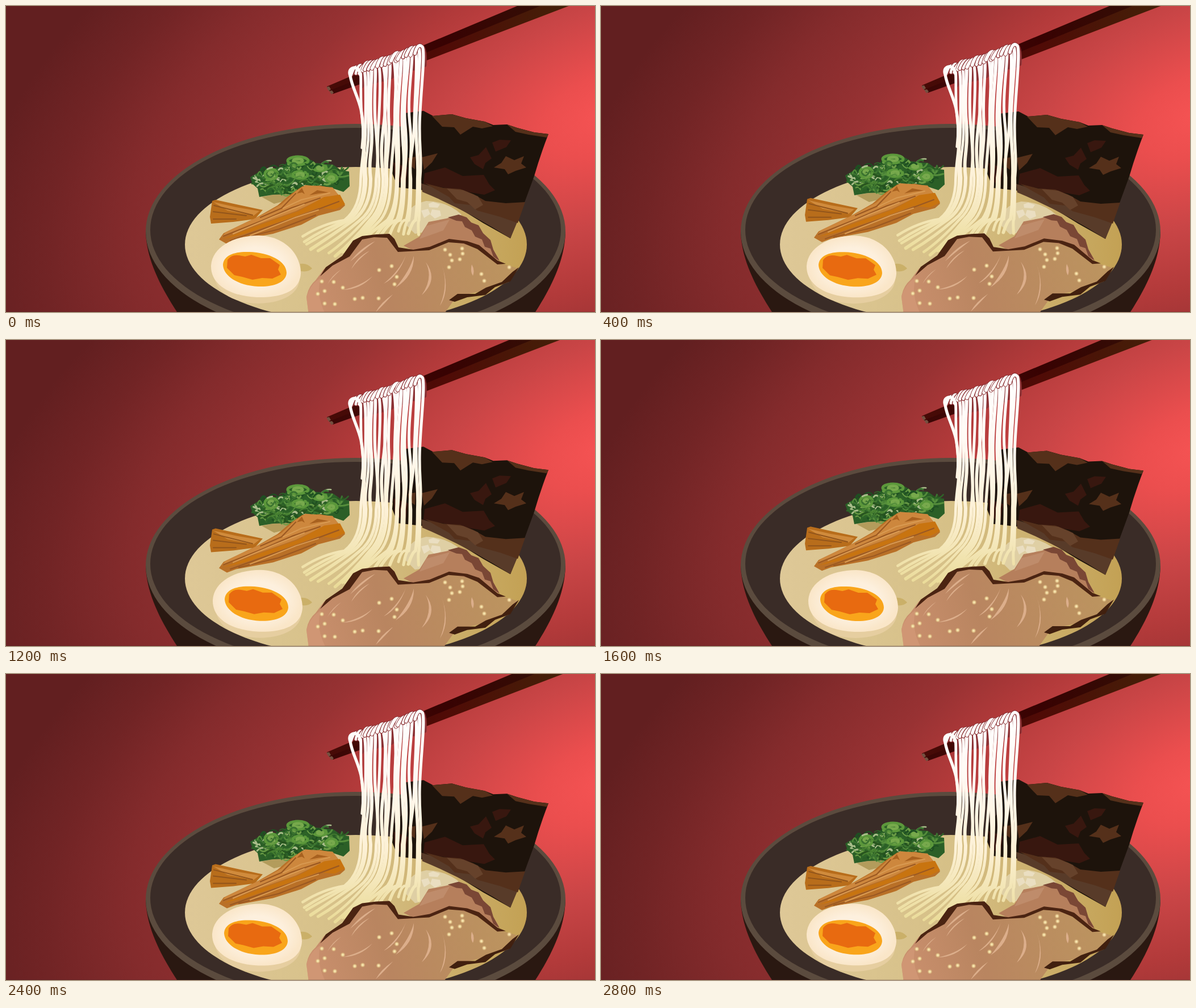
Recreate the animation shown at these times as an HTML page. Size 1037 by 540 pixels, loop 3200 ms.

```html
<!DOCTYPE html>
<html lang="en">
<head>
<meta charset="utf-8">
<title>Noodle bowl</title>
<style>
html, body { margin: 0; width: 100%; height: 100%; overflow: hidden; background: #802a2b }
svg { display: block; width: 1037px; height: 540px }
.line { fill: none; stroke-linecap: round; stroke-linejoin: round }
</style>
</head>
<body>
<svg viewBox="0 0 1037 540">
<defs>
  <radialGradient id="wall" gradientUnits="userSpaceOnUse" cx="0" cy="0" r="1" gradientTransform="translate(1060 190) rotate(-22) scale(1200 680)">
    <stop offset="0" stop-color="#f65353"/><stop offset=".1" stop-color="#eb4e4e"/>
    <stop offset=".27" stop-color="#c94546"/><stop offset=".42" stop-color="#b23a3a"/>
    <stop offset=".56" stop-color="#983233"/><stop offset=".74" stop-color="#842b2c"/>
    <stop offset=".87" stop-color="#712425"/><stop offset="1" stop-color="#621f20"/>
  </radialGradient>
  <linearGradient id="broth"><stop stop-color="#dec897"/><stop offset=".5" stop-color="#d6c087"/><stop offset="1" stop-color="#c3a154"/></linearGradient>
  <linearGradient id="strand" gradientUnits="userSpaceOnUse" x1="0" y1="70" x2="0" y2="440">
    <stop stop-color="#fff"/><stop offset=".3" stop-color="#fffaf4"/><stop offset=".65" stop-color="#fdf1d6"/><stop offset="1" stop-color="#eadb98"/>
  </linearGradient>
  <linearGradient id="meat" x1="0" y1=".5" x2="1" y2=".4"><stop stop-color="#c98f6d"/><stop offset=".35" stop-color="#b98560"/><stop offset="1" stop-color="#bc955f"/></linearGradient>
  <linearGradient id="stickTop" gradientUnits="userSpaceOnUse" x1="566" y1="0" x2="980" y2="0"><stop stop-color="#480b07"/><stop offset=".5" stop-color="#380202"/><stop offset="1" stop-color="#321006"/></linearGradient>
  <linearGradient id="stickLow" gradientUnits="userSpaceOnUse" x1="566" y1="0" x2="980" y2="0"><stop stop-color="#3a0605"/><stop offset=".5" stop-color="#500b06"/><stop offset="1" stop-color="#432008"/></linearGradient>
  <radialGradient id="white"><stop offset=".6" stop-color="#fdf0de"/><stop offset="1" stop-color="#fae6c8"/></radialGradient>
  <radialGradient id="seed"><stop stop-color="#fff3c4"/><stop offset=".5" stop-color="#ecd297"/><stop offset="1" stop-color="#d2ac75" stop-opacity=".5"/></radialGradient>
</defs>

<rect width="1037" height="540" fill="url(#wall)"/>
<path fill="#2a1811" d="M246 398C247 445 270 492 301 540H932C964 490 984 445 985 398Z"/>
<ellipse cx="615.5" cy="398" rx="369.5" ry="190" fill="#5b4b3e"/>
<ellipse cx="615.5" cy="395" rx="361.5" ry="180" fill="#3a2c27"/>
<ellipse cx="616" cy="421" rx="301" ry="137" fill="url(#broth)"/>
<path fill="#c2a351" opacity=".6" d="M518 455Q530 453 539 463Q533 470 519 468Z"/>

<g data-move="0 1.1">
  <path fill="#dfcfa4" d="M703 385Q702 352 740 344Q778 345 802 368L775 392 720 402Z"/>
  <path fill="#f0e7d1" opacity=".65" d="M744 349l8-3 12 4-4 6-15-1zM731 361l12-3 4 9-11 7zM750 359l14 2 2 9-11 5-8-7z"/>
  <path fill="#1d130b" d="M702 189L735 185 752 194 785 191 810 198 843 204 858 210 882 209 900 215 930 223 955 226Q941 262 930 300L911 352 888 410 840 383 790 352 735 325 690 320 680 295 683 262 703 240Z"/>
  <path fill="#55301a" d="M750 194L785 191 810 198 843 204 857 212 838 216 822 213 800 227 789 214 768 213ZM882 209L900 215 930 223 955 226 952 232 920 227 897 222ZM732 267L760 260 750 276 736 289ZM708 268L721 266 720 288 709 280ZM859 285L872 277 880 265 895 272 912 265 907 278 916 285 897 291 884 297 878 288Z"/>
  <path fill="#38170f" d="M856 241L869 236 889 237 881 249 862 257ZM817 267L832 263 845 249 855 269 844 277 840 288 825 279ZM682 276L708 285 703 320 684 302ZM737 295L773 285 804 300 841 298 851 315 861 325 842 333 800 326 735 314Z"/>
  <path fill="#583b29" d="M731 313Q790 330 850 351L904 372 888 410Q810 360 733 328Z"/>
  <path fill="#54301b" d="M738 313L770 321 800 323 823 332 844 344 880 348 914 346 901 383 870 372 830 361 817 351 790 348 780 337Z"/>
  <path fill="#66422b" d="M776 322L805 325 831 336 840 351 826 359 812 346 794 341Z"/>
</g>

<g data-move="0 -3">
  <path fill="#b39c5c" d="M450 337L495 328 500 342 472 349Z"/>
  <path fill="#2b5f27" d="M430 302L445 293 464 290 490 281 500 270 534 270 545 277 576 280 590 290 604 292 605 318 594 328 570 320 500 332 470 333 446 337 443 322 434 314Z"/>
  <g id="leaves" class="line"></g>
</g>

<g data-move="0 -3.2">
  <path fill="#b86d1b" d="M363 344L369 342 410 351 452 360 438 376 400 381 361 384 359 372Z"/>
  <path fill="#d08b3c" d="M365 346L405 355 446 362 436 370 390 361Z"/>
  <path class="line" stroke="#92551b" stroke-width="2" d="M366 352L434 369M365 363L423 370M365 376L405 376"/>
  <path fill="#b97027" d="M375 412L383 401 443 372 478 352 500 333 522 318 553 317 574 321 586 334 597 352 588 360 550 370 520 386 470 402 405 414 389 420Z"/>
  <path fill="#cd873d" d="M450 369L485 350 510 327 527 316 575 320 585 333 550 343 510 362 450 383 380 407 387 399Z"/>
  <path fill="#c87410" d="M382 411L450 385 515 362 560 337 588 333 597 350 579 359 550 356 490 378 420 402Z"/>
  <path class="line" stroke="#9b5922" stroke-width="2.2" d="M383 406L450 379 503 356 553 339M395 414L470 387 530 366 586 345M448 373L485 357 510 331M410 411L480 394 545 369"/>
  <path fill="#a8611f" d="M512 331l9-10 5 11-5-3zM534 334l14-9 20 4-18 2z"/>
  <path class="line" stroke="#d99b53" stroke-width="2" d="M400 402L470 372 525 350M430 405L510 373 550 360M488 357L520 342 570 330"/>
</g>

<g data-move="1 .25">
  <path fill="#e6cea0" d="M364 460C364 510 405 524 444 525C490 524 519 506 517 476Z"/>
  <path fill="url(#white)" d="M361 458C363 426 400 405 445 405C490 406 519 437 519 472C517 504 484 515 442 514C397 512 360 493 361 458Z"/>
  <path fill="#f9a51b" d="M382 457C383 440 402 433 428 434C463 435 494 450 494 471C493 488 471 496 444 495C407 493 383 476 382 457Z"/>
  <path fill="#e86a10" d="M390 448Q397 438 410 440L421 442 432 439 449 445 465 445 475 452 482 457 479 465 484 474 469 481 451 480 434 483 416 478 402 475 389 462Z"/>
</g>

<g data-move="0 -2">
  <path fill="url(#stickTop)" d="M565 142L621 118 738 68 900 0 990 -40 1040-40 738 86 570 151Z"/>
  <path fill="url(#stickLow)" d="M570 149L738 83 950-4 1095-40 738 97 576 155Z"/>
  <path fill="#745040" d="M564 143l5-1 3 5-4 3zM569 150l5-1 3 4-4 3z"/>
  <g id="noodles" class="line"></g>
</g>

<g data-move="0 -.75">
  <path fill="#b67f5c" d="M700 423L728 407 744 381 775 375 797 369 818 381 840 401 868 447 840 465 735 440Z"/>
  <path fill="#c9997a" opacity=".5" d="M740 388L781 377 770 396 728 411Z"/>
  <path fill="#7a4735" d="M778 373L797 368 811 373 819 382 832 387 840 401 853 413 858 430 869 450 858 442 853 428 843 425 838 412 826 407 820 396 808 390 803 380 793 379Z"/>
  <path fill="url(#meat)" d="M529 514Q532 495 545 484L560 464 597 442 623 410 650 406 674 407 690 431 745 430 779 415 829 425 863 452 902 463 885 487 850 500 793 513 770 545 533 545Z"/>
  <path fill="#d59b7a" opacity=".6" d="M529 514Q536 490 554 480Q545 510 563 545H533Z"/>
  <path fill="#4b2412" d="M553 477L563 461 592 441 611 414 627 406 652 403 675 402 684 411 691 426 717 430 746 425 780 411 812 415 833 422 865 449 880 455 865 456 830 429 806 419 779 417 745 431 690 434 671 409 648 408 627 412 605 442 575 458Z"/>
  <path fill="#41200f" d="M903 461L888 486 861 496 844 510 812 514 790 522 780 519 795 508 826 508 845 497 873 487 892 469Z"/>
  <path fill="#dcae8b" d="M650 415Q624 427 606 451Q629 431 650 415M640 432Q618 443 608 464Q620 447 640 432M590 465Q574 475 566 491Q574 479 590 465M645 477Q625 494 593 501Q625 500 645 477M704 440Q693 467 665 490Q691 477 704 440M718 441Q712 466 686 497Q719 476 718 441M739 452Q753 480 732 510Q762 483 739 452M765 451Q781 489 764 529Q784 498 765 451M681 509Q660 523 651 540Q661 531 681 509M820 456q6 10 2 20q-5-8-2-20"/>
  <g id="seeds" fill="url(#seed)"></g>
</g>
<rect y="539" width="1037" height="1" fill="#30161a" opacity=".2"/>
</svg>
<script>
const $ = id => document.getElementById(id);
let seed = 11;
const rnd = () => (seed = seed * 16807 % 2147483647) / 2147483647;
const spread = size => (rnd() - .5) * size;

function line(parent, d, stroke, width) {
  const path = document.createElementNS("http://www.w3.org/2000/svg", "path");
  for (const [key, value] of Object.entries({ d, stroke, "stroke-width": width })) path.setAttribute(key, value);
  parent.append(path);
}

// Chopped scallions: curls scattered over an oval, with some rings between them.
const greens = ["#1f4f22", "#3b7330", "#548d3b", "#28551f", "#6b9c46", "#477f31", "#a9bd8a", "#2e6428"];
function curls(n) {
  for (let i = 0; i < n; i++) {
    const angle = rnd() * 2 * Math.PI, r = Math.sqrt(rnd()), w = 6 + rnd() * 11;
    const x = 512 + Math.cos(angle) * r * 80, y = 304 + Math.sin(angle) * r * 29 - (x - 512) * .06;
    line($("leaves"), `M${x} ${y}q${w / 2} ${spread(24)} ${w} ${spread(14)}`, greens[i % 8], 1.5 + rnd() * 2.5);
  }
}
curls(130);
for (const [x, y, rx, ry] of [[514, 273, 18, 7], [467, 297, 11, 9], [518, 298, 13, 6], [553, 286, 11, 5], [573, 304, 10, 6]]) {
  const ring = (a, b) => `M${x - a} ${y}a${a} ${b} 0 1 1 ${2 * a} 0a${a} ${b} 0 1 1 ${-2 * a} 0`;
  line($("leaves"), ring(rx, ry), "#5c983b", 5);
  line($("leaves"), ring(rx * .45, ry * .45), "#77a94c", 5);
}
curls(45);

// Where a strand ends, as a function of its place across the bundle.
const ends = [[522, 406], [530, 428], [578, 440], [602, 430], [655, 404], [690, 398], [723, 403]];
function endOf(u) {
  const s = u * (ends.length - 1), i = Math.min(Math.floor(s), ends.length - 2), f = s - i;
  return [0, 1].map(axis => ends[i][axis] * (1 - f) + ends[i + 1][axis] * f);
}
const count = 18, noodles = $("noodles");
for (let i = 0; i < count; i++) {
  const u = i / (count - 1), x = 620 + u * 111, y = 110 - u * 38 + spread(4);
  const midX = 627 + u * 102 + spread(7), lowX = 625 + u * 103 + spread(7);
  const [endX, endY] = endOf(u), reach = lowX - endX;
  const over = `M${x - 10 - rnd() * 6} ${y + 12}Q${x - 6} ${y - 8} ${x + 2} ${y}`;
  const fall = `C${x + 8} ${y + 9} ${midX + spread(14)} 155 ${midX} 205S${lowX + spread(12)} 265 ${lowX} 305`;
  const tail = `C${lowX} 335 ${lowX - reach * .08} 362 ${lowX - reach * .28} 378` +
    `Q${lowX - reach * .65} ${endY - 22} ${endX + spread(8)} ${endY + spread(8)}`;
  line(noodles, over + `Q${x + 7} ${y + 6} ${x + 6} ${y + 32}`, "#8c3235", 7.4);
  line(noodles, over + fall + tail, "url(#strand)", 4.6 + rnd() * 1.4);
}
line(noodles, "M624 122Q622 108 612 109Q602 112 606 123C609 143 620 160 625 183S630 225 627 250", "url(#strand)", 5.2);

const sesame = [556, 486, 577, 487, 561, 503, 549, 508, 593, 497, 561, 525, 579, 526, 614, 517, 628, 515, 656, 516, 657, 466, 679, 459, 688, 478, 684, 491,
  773, 430, 803, 428, 782, 439, 804, 437, 799, 447, 785, 449, 780, 461, 837, 473, 842, 485, 886, 461];
for (let i = 0; i < sesame.length; i += 2)
  $("seeds").innerHTML += `<circle cx="${sesame[i]}" cy="${sesame[i + 1]}" r="4"/>`;

// Every part drifts four held steps out and four back.
const parts = [...document.querySelectorAll("[data-move]")].map(el => [el, ...el.dataset.move.split(" ").map(Number)]);
const start = performance.now();
function draw() {
  const step = Math.floor(Math.max(0, performance.now() - start) / 400) % 8;
  const k = 4 - Math.abs(4 - step);
  for (const [el, dx, dy] of parts) el.setAttribute("transform", `translate(${dx * k} ${dy * k})`);
  requestAnimationFrame(draw);
}
draw();
</script>
</body>
</html>
```
